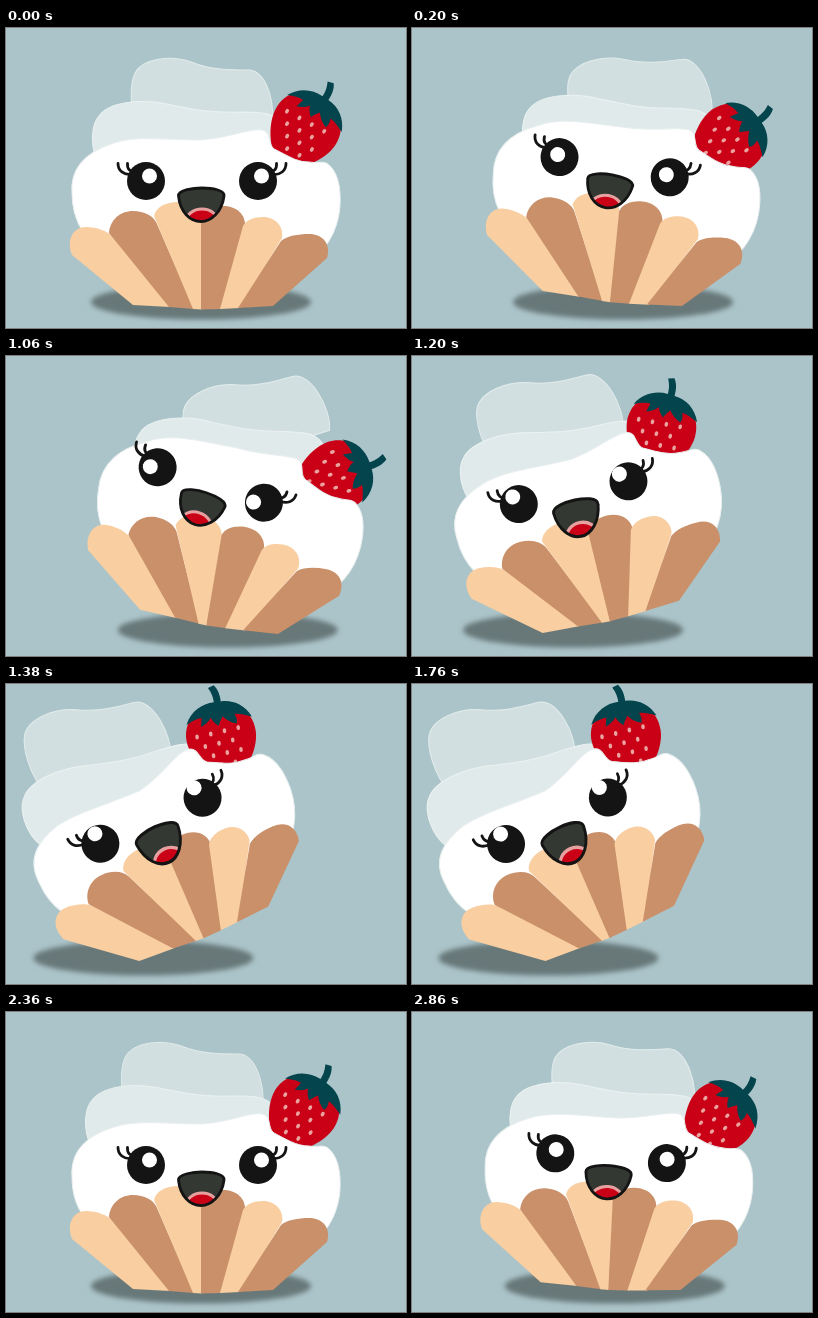
Animation of 400x300 px, one loop 2880 ms. Source, as an HTML page:

```html
<!DOCTYPE html>
<html lang="en">
<head>
<meta charset="utf-8">
<title>Dancing cupcake</title>
<style>
  html, body { margin: 0; width: 100%; height: 100%; overflow: hidden; background: #abc4c9; }
  svg { display: block; width: 100%; height: 100%; }
  .light { fill: #f9cea1; }
  .dark { fill: #c9906a; }
  .line { fill: none; stroke: #131413; stroke-width: 2.8; stroke-linecap: round; }
</style>
</head>
<body>
<svg viewBox="0 0 400 300">
  <defs>
    <filter id="soft" x="-20%" y="-60%" width="140%" height="220%"><feGaussianBlur stdDeviation="2.6"/></filter>
    <path id="lips" d="M172.500 168C172 162 188 160 196 160C206 160 219 162 218 168C216 184 205 193.500 195 193.500C184 193.500 174 184 172.500 168Z"/>
    <clipPath id="inside"><use href="#lips"/></clipPath>
  </defs>

  <ellipse id="shadow" cx="195" cy="274" rx="110" ry="17.500" fill="#677879" filter="url(#soft)"/>

  <g id="top"><path transform="translate(-196 -57)" fill="#d2dfe0" stroke="#e3ecec"
    d="M135 108C122 85 124 55 129 45C137 30 165 27 185 34C205 42 225 42 243 42C262 42 272 84 264 104Z"/></g>

  <g id="mid"><path transform="translate(-176 -95)" fill="#e0eaeb" stroke="#ecf2f2"
    d="M104 146C84 136 82 100 93 88C103 74 135 70 165 77C190 82 205 85 235 84C255 84 272 84 277 100L270 130Z"/></g>

  <g id="berry">
    <path fill="#c90016" d="M0-31C20-33 35-20 35 0C35 22 14 46 2 46C-12 46-34 22-35 0C-35-20-20-33 0-31Z"/>
    <g id="seeds" fill="#eba3a0"></g>
    <path fill="#04444d" d="M-33-15C-27-28-15-34-3-34C-3-41-5-45-7-49L-1-51C3-46 4-40 4-34C16-34 27-28 33-15C26-18 20-20 16-20C18-16 18-13 17-10C11-12 7-15 4-19C2-16 0-13-1-10C-5-13-7-16-8-19C-11-15-14-13-19-11C-18-14-18-17-17-20C-22-20-27-18-33-15Z"/>
  </g>

  <g id="base">
    <path id="cream" fill="#fff" stroke="#e9efef"/>
    <path class="light" d="M127 277L66 227C60 212 67 199 80 199C91 199 101 203 106 208L164 279Z"/>
    <path class="dark" d="M163 279L103 205C104 192 114 183 127 183C138 183 148 188 151 196L188 281Z"/>
    <path class="light" d="M187 281L148 188C150 179 160 174 172 174C184 174 193 180 195.500 190V281.500Z"/>
    <path class="dark" d="M195 281.500V190C197 183 206 178 217 178C230 178 240 186 239 199L215 281Z"/>
    <path class="light" d="M214 281L237 198C240 192 248 189 257 189C270 189 278 199 276 210L234 280Z"/>
    <path class="dark" d="M232 280L275 213C281 208 292 206 303 206C317 206 325 216 321 230L267 278Z"/>
  </g>

  <g id="face">
    <g class="line">
      <path d="M-84-17.500C-84-10-78-6-71-6.500M-74.500-17.500C-75-12-72-9-67-9"/>
      <path d="M84-17.500C84-10 78-6 71-6.500M74.500-17.500C75-12 72-9 67-9"/>
    </g>
    <circle cx="-56" r="19" fill="#131413"/>
    <circle cx="56" r="19" fill="#131413"/>
    <circle id="glintL" r="7.500" fill="#fff"/>
    <circle id="glintR" r="7.500" fill="#fff"/>
    <g id="mouth"><g transform="translate(-195.500 -160)">
      <use href="#lips" fill="#343832"/>
      <ellipse cx="196" cy="194" rx="16" ry="13" fill="#c90016" stroke="#e6a09f" stroke-width="3" clip-path="url(#inside)"/>
      <use href="#lips" class="line"/>
    </g></g>
  </g>
</svg>

<script>
const LOOP = 2880, CYCLE = 2740;
const el = id => document.getElementById(id);

// Each part knows three poses: at rest, leaning right, leaning left
const base = { rest: [0, 0], right: [11.8, -12], left: [-23.6, 9] };                        // angle, bulge
const face = { rest: [0, 0, 0, 1], right: [-19, -15, 9.5, 1], left: [-2, 1, -1, 1.14] };    // x, y, turn, mouth
const gaze = { rest: [3.5, -5, 0], right: [-9, 0, 1.5], left: [-7, -10, 1.5] };             // x, y, eye difference
const mid = { rest: [176, 95, 0], right: [226, 84, 3], left: [98, 95, -18] };               // x, y, turn
const topping = { rest: [196, 57, 0], right: [256, 48, -16], left: [85, 45, -15] };
const berry = { rest: [300, 98, 34], right: [340, 124, 78], left: [214, 51, -8] };

// The standard "ease" curve, cubic-bezier(.25, .1, .25, 1)
function ease(x) {
  if (x <= 0) return 0;
  if (x >= 1) return 1;
  const curve = (s, a, b) => 3 * a * s * (1 - s) ** 2 + 3 * b * s * s * (1 - s) + s ** 3;
  let lo = 0, hi = 1;
  for (let i = 0; i < 20; i++) {
    const s = (lo + hi) / 2;
    if (curve(s, .25, .25) < x) lo = s; else hi = s;
  }
  return curve(lo, .1, 1);
}

const mix = (a, b, p) => a + (b - a) * p;

// Rest, right, left and back; lag and slow delay the way back
function swing(part, t, lag = 0, slow = 1) {
  const out = ease(t / 700);
  const over = ease((t - 1030) / 400);
  const back = ease((t - 1925 - lag) / (400 * slow));
  return part.rest.map((v, i) =>
    mix(mix(mix(v, part.right[i], out), part.left[i], over), v, back));
}

function turn(x, y, deg) {
  const r = deg * Math.PI / 180, c = Math.cos(r), s = Math.sin(r);
  return [x * c - y * s, x * s + y * c];
}

function place(id, x, y, deg = 0, sy = 1) {
  el(id).setAttribute('transform', `translate(${x} ${y}) rotate(${deg}) scale(1 ${sy})`);
}

// Upper layers turn with the case but slide back late
function placeLayer(id, part, t) {
  const [, y, deg] = swing(part, t);
  place(id, swing(part, t, 50, 1.5)[0], y, deg);
}

// b lowers the middle of the top edge
const creamPath = b => `M66 165C64 138 82 ${124 + b / 3} 105 ${116 + b / 2}
  C130 ${107 + b} 160 ${112 + b} 195 ${112 + b}C225 ${110 + b / 2} 243 100 256 102
  C266 104 261 116 268 121C280 127 290 134 303 134C312 136 318 131 324 138
  C332 146 335 160 334 178C332 205 318 225 300 235L110 240C85 215 66 200 66 165Z`;

function addSeeds() {
  let dots = '';
  for (let row = 0; row < 4; row++) {
    const edge = 27 - row * 4;
    for (let x = -24 + row % 2 * 7; x < edge; x += 14) {
      if (x > -edge) dots += `<ellipse cx="${x}" cy="${row * 11 - 4 - x * .1}" rx="1.800" ry="2.500"/>`;
    }
  }
  el('seeds').innerHTML = dots;
}

function draw(t) {
  const [a, bulge] = swing(base, t);

  // The case tips over its right or left bottom corner
  const [px, py] = a >= 0 ? [267, 279] : [127, 277];
  const slide = a >= 0 ? a * .5 : -a * .27;
  el('base').setAttribute('transform', `translate(${slide} 0) rotate(${a} ${px} ${py})`);
  el('cream').setAttribute('d', creamPath(bulge));
  place('shadow', a * (a >= 0 ? 2.8 : 2.48), 0);

  const [fx, fy, fr, open] = swing(face, t);
  const [ex, ey] = turn(196 - px, 153 - py, a);
  place('face', px + slide + ex + fx, py + ey + fy, a + fr);
  place('mouth', -.5 - Math.max(0, fr) * .2, 7 + Math.max(0, fr) * .2, 0, open);

  const [gx, gy, gap] = swing(gaze, t);
  const [lx, ly] = turn(gx + gap, gy, -a - fr);
  const [rx, ry] = turn(gx - gap, gy, -a - fr);
  place('glintL', lx - 56, ly);
  place('glintR', rx + 56, ry);

  placeLayer('mid', mid, t);
  placeLayer('top', topping, t);
  place('berry', ...swing(berry, t, 40, 1.2));
}

function frame() {
  draw(performance.now() % LOOP % CYCLE);
  requestAnimationFrame(frame);
}
addSeeds();
draw(0);
requestAnimationFrame(frame);
</script>
</body>
</html>
```
